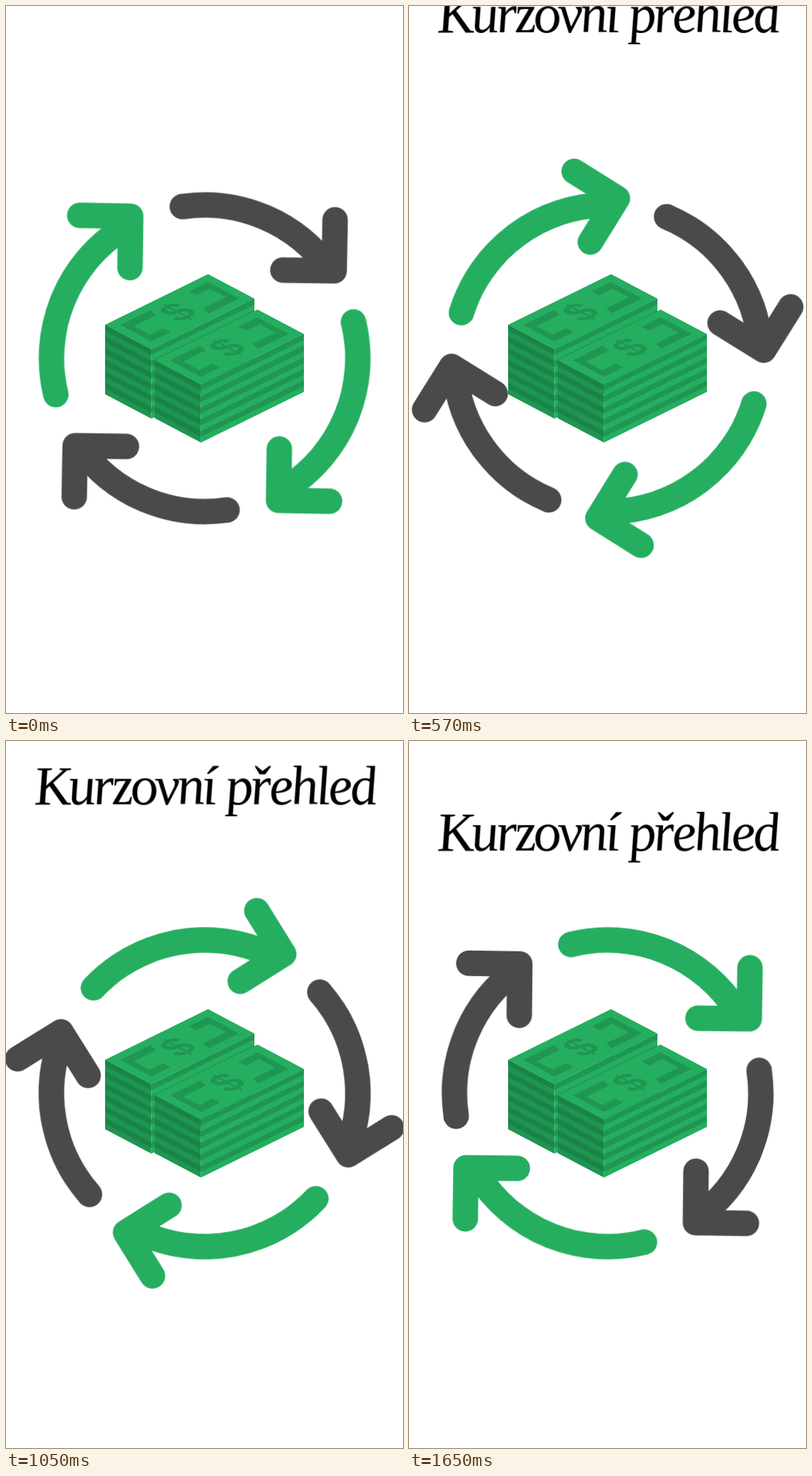
An HTML page for the animation above (4.82 s loop, 561x998 px).

```html
<!DOCTYPE html>
<html lang="cs">
<head>
<meta charset="utf-8">
<title>Kurzovní přehled</title>
<style>
  html, body { margin: 0; width: 100%; height: 100%; overflow: hidden; background: #fff; }
  svg { display: block; width: 100%; height: 100%; }
  .arrow { fill: none; stroke-width: 36; stroke-linecap: round; stroke-linejoin: round; }
  .green { stroke: #25ae60; }
  .gray { stroke: #4a4a4a; }
  .title { font: italic 78px "Liberation Serif", "Times New Roman", serif; letter-spacing: -3.9px; }
  .dollar { font: bold 56px "Liberation Sans", Arial, sans-serif; text-anchor: middle; fill: #1f9652; }
</style>
</head>
<body>
<svg viewBox="0 0 561 998" xmlns="http://www.w3.org/2000/svg">
  <defs>
    <g id="bill">
      <g transform="matrix(1.455 -.715 .655 .345 0 0)">
        <path fill="#25ae60" d="M0 0H100V100H0Z"/>
        <path id="bracket" fill="#1f9652" d="M37 16.5H7.5V83.5H26V67.5H13V32.5H35Z"/>
        <use href="#bracket" transform="rotate(180 50 50)"/>
      </g>
      <text class="dollar" transform="matrix(.895 -.437 .88 .464 103 -18)" y="18.5">$</text>
    </g>
  </defs>
  <g transform="translate(280.7 497.3)"><g id="ring"></g></g>
  <g id="money"></g>
  <g id="title"><text class="title" transform="translate(42 -24.5) skewX(6)">Kurzovní přehled</text></g>
</svg>
<script>
const $ = id => document.getElementById(id);
const RADIUS = 216.5, LOOP = 4820, MOVE = 1650, STEPS = 55;

function add(parent, tag, attrs) {
  const el = document.createElementNS("http://www.w3.org/2000/svg", tag);
  for (const key in attrs) el.setAttribute(key, attrs[key]);
  return parent.appendChild(el);
}

function polar(deg) {
  const a = deg * Math.PI / 180;
  return `${RADIUS * Math.cos(a)} ${RADIUS * Math.sin(a)}`;
}

// Arc from tail to head, with a two-armed head whose elbow is at (x, y).
function arrow(turn, color, tail, end, x, y) {
  const g = add($("ring"), "g", { class: `arrow ${color}`, transform: `rotate(${turn})` });
  add(g, "path", { d: `M${polar(tail)}A${RADIUS} ${RADIUS} 0 0 1 ${polar(end)}` });
  add(g, "path", { d: `M${x + 1.3} ${y - 72}L${x} ${y}l-72.5 -1` });
}

// Striped side of a stack: w, h is its slanted upper edge.
function side(x, y, w, h, bills, light, dark) {
  const pitch = 16.35;
  const band = (top, size, fill) => add($("money"), "path", {
    fill, d: `M${x} ${y + top}l${w} ${h}v${size}l${-w} ${-h}Z`
  });
  band(0, bills * pitch, light);
  for (let i = 0; i < bills; i++) band(i * pitch, pitch / 2, dark);
}

function stack(x, y, bills) {
  side(x, y, 65.5, 34.5, bills, "#1f9552", "#1a8448");
  side(x + 65.5, y + 34.5, 145.5, -71.5, bills, "#25ae60", "#1f9652");
  add($("money"), "use", { href: "#bill", transform: `translate(${x} ${y})` });
}

function move(id, from, to) {
  $(id).animate([
    { transform: from, easing: `steps(${STEPS}, end)` },
    { transform: to, offset: MOVE / LOOP },
    { transform: to }
  ], { duration: LOOP, iterations: Infinity });
}

for (const half of [0, 180]) {
  arrow(half, "gray", 261.6, 325, 183, -123.5);
  arrow(half - 90, "green", 256.3, 328, 200.5, -104.5);
}
stack(140, 450, 6);
stack(210, 500, 5);

move("ring", "rotate(0deg)", "rotate(89.8deg)");
move("title", "translateY(0px)", "translateY(179.5px)");
</script>
</body>
</html>
```
